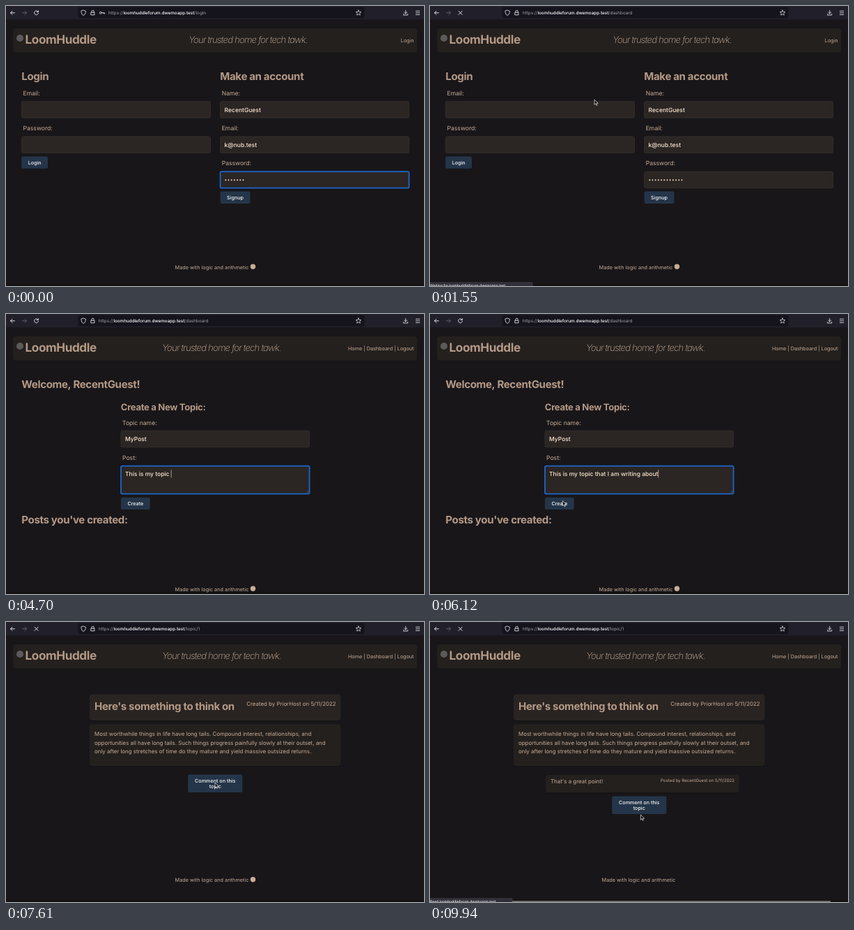
An HTML page for the animation above (10 s loop, 600 by 401 pixels).

```html
<!DOCTYPE html>
<html lang="en">
<head>
<meta charset="utf-8">
<title>Forum walkthrough</title>
<style>
  html, body { margin: 0; width: 100%; height: 100%; overflow: hidden; background: #181619; }
  svg { display: block; width: 100vw; height: 100vh; font-family: Inter, "Open Sans", sans-serif; text-rendering: geometricPrecision; }
</style>
</head>
<body>
<svg id="stage" viewBox="0 0 600 401"></svg>
<script>
const LOOP = 10000;
const TAN = '#c8ad97', HEAD = '#b39885', PEACH = '#ffe8d4', BAR = '#24201e', CARD = '#292422', FIELD = '#2b2624', BLUE = '#b9e3f7';
const BRAND = 'LoomHuddle', HOST = 'loomhuddleforum.dwemoapp.test';
const USER = 'RecentGuest', AUTHOR = 'PriorHost', DATE = 'on 5/11/2022';
const TITLE = "Here's something to think on";
const TOPIC = 'This is my topic that I am writing about';
const COMMENT = "That's a great point!";
const QUOTE = 'Most worthwhile things in life have long tails. Compound interest, relationships, and opportunities all have long tails. Such things progress painfully slowly at their outset, and only after long stretches of time do they mature and yield massive outsized returns.';

const stage = document.getElementById('stage');
const pen = document.createElement('canvas').getContext('2d');

// ---- drawing helpers ----
const rect = (x, y, r, b, fill, radius = 0, extra = '') =>
  `<rect x="${x}" y="${y}" width="${r - x}" height="${b - y}" rx="${radius}" fill="${fill}" ${extra}/>`;
const line = (d, color, width = 1) =>
  `<path d="${d}" fill="none" stroke="${color}" stroke-width="${width}" stroke-linecap="round" stroke-linejoin="round"/>`;
const dot = (x, y, r, fill) => `<circle cx="${x}" cy="${y}" r="${r}" fill="${fill}"/>`;
const text = (s, x, y, size, fill = TAN, anchor = 'start', extra = '') =>
  `<text x="${x}" y="${y}" font-size="${size}" fill="${fill}" text-anchor="${anchor}" ${extra}>${s.replace(/ /g, '\u00a0')}</text>`;
const heading = (s, x, y, size = 15.1, anchor = 'start', fill = HEAD) =>
  text(s, x, y, size, fill, anchor, 'font-weight="700" letter-spacing="-.025em"');
const label = (s, x, y, anchor) => text(s, x, y, 8.6, TAN, anchor);
const card = (y, b, fill = CARD, x = 120, r = 480.5) =>
  rect(x, y + 1, r, b + 1.2, '#121011', 4, 'opacity=".6"') + rect(x, y, r, b, fill, 4);
const lines = (words, breaks, x, y, step, size, anchor) => {
  let rest = words;
  return [...breaks, null].map((start, i) => {
    const cut = start ? rest.indexOf(start) : rest.length;
    const part = rest.slice(0, cut).trim();
    rest = rest.slice(cut);
    return text(part, x, y + i * step, size, TAN, anchor);
  }).join('');
};

function button(s, x, y, r, b) {
  const rows = s.split('\n'), mid = (y + b) / 2 + 2.6 - (rows.length - 1) * 4.4;
  return rect(x, y, r, b, '#253549', 2) +
    rows.map((row, i) => text(row, (x + r) / 2, mid + i * 8.8, 7.2, '#f6f8fb', 'middle', 'font-weight="500"')).join('');
}

function field(x, y, r, b, { value = '', focus = false, caret = focus, area = false } = {}) {
  let out = rect(x, y, r, b, FIELD, 2, `stroke="${focus ? '#1c66c9' : '#3b3430'}" stroke-width="${focus ? 1.8 : .7}"`);
  if (area) out += line(`M${r - 4.5} ${b - 1.5}l3 -3M${r - 2.5} ${b - 1.5}l1 -1`, '#6b625c', .5);
  const base = area ? y + 14.3 : y + 15.2;
  out += text(value, x + 6, base, 8.5, PEACH, 'start', 'font-weight="500"');
  if (caret) {
    pen.font = '500 85px Inter, "Open Sans", sans-serif';
    const cx = x + 6.4 + pen.measureText(value).width / 10;
    out += line(`M${cx} ${base - 8.6}V${base + 2.2}`, PEACH, .6);
  }
  return out;
}

function footer(y, icon = true) {
  return text('Made with logic and arithmetic', icon ? 295.5 : 299.5, y + 2.8, 7.3, TAN, 'middle') +
    (icon ? dot(354.5, y - .7, 3.7, TAN) : '');
}

function header(guest) {
  return rect(10.5, 32, 590, 66.3, BAR, 4) + dot(20, 46, 5, '#5d5a5b') +
    heading(BRAND, 27.5, 53.8, 17.2) +
    text('Your trusted home for tech tawk.', guest ? 347.5 : 309.5, 52.6, 13.2, '#ccb29c', 'middle',
      'font-style="italic" font-weight="200" letter-spacing="-.06em"') +
    text(guest ? 'Login' : 'Home | Dashboard | Logout', 585.5, 52.2, 7.25, TAN, 'end');
}

// ---- timing helpers ----
const at = (steps, t) => steps.reduce((now, s) => s[0] <= t ? s : now, steps[0]);
const typed = (s, t, start, end) =>
  s.slice(0, Math.max(0, Math.min(s.length, Math.floor((t - start) / (end - start) * s.length + 1))));

// ---- pages ----
const pages = {
  login(t) {
    const dots = Math.min(12, 7 + Math.floor(t / 45));
    let out = header(true) + heading('Login', 22.3, 106.2) + heading('Make an account', 307.3, 106.2) +
      label('Email:', 24.5, 128) + field(22.3, 136.7, 293.5, 160.2) +
      label('Password:', 24.5, 178) + field(22.3, 186.9, 293.5, 210.4) + button('Login', 22.3, 215.5, 60, 232.8) +
      label('Name:', 309.7, 128) + field(307.6, 136.7, 578.5, 160.2, { value: USER }) +
      label('Email:', 309.7, 178) + field(307.6, 186.9, 578.5, 210.4, { value: 'k@nub.test' }) +
      label('Password:', 309.7, 228.3) + field(307.6, 237.1, 578.5, 260.7, { focus: t < 950, caret: false }) +
      button('Signup', 307.6, 265.6, 350.4, 283);
    for (let i = 0; i < dots; i++) out += dot(315.3 + i * 4.2, 249.2, .95, PEACH);
    return out + footer(374);
  },
  dashboard(t) {
    const first = TOPIC.slice(0, 17), rest = TOPIC.slice(17);
    return header() + heading(`Welcome, ${USER}!`, 22.3, 106.2) +
      heading('Create a New Topic:', 164.8, 137.8, 13.1) +
      label('Topic name:', 167, 158.6) +
      field(165, 167.2, 435.6, 190.8, { value: typed('MyPost', t, 3130, 3400), focus: t >= 2970 && t < 3690 }) +
      label('Post:', 167, 208.7) +
      field(165, 217.7, 435.6, 257.6, {
        value: typed(first, t, 3960, 4690) + typed(rest, t, 4790, 5760),
        focus: t >= 3690 && t < 6230, area: true
      }) +
      button('Create', 165, 262.7, 206.7, 280) +
      heading("Posts you've created:", 22.3, 300.2) + footer(394);
  },
  list(t, mouse) {
    const hover = mouse.y > 110 && mouse.y < 130;
    return header() + card(103.6, 141) + heading(TITLE, 127, 126, 15.1, 'start', hover ? BLUE : HEAD) +
      text(`Created by ${AUTHOR} ${DATE}`, 473.6, 120.4, 7.9, TAN, 'end') +
      card(146.5, 186.8, BAR) + lines(QUOTE, ['have long tails. Such', 'time do'], 127, 160.6, 8.9, 7.3) +
      card(207.5, 245) + heading('MyPost', 127, 229.9) +
      text(`Created by ${USER} ${DATE}`, 473.6, 224.3, 7.9, TAN, 'end') +
      card(249.7, 273.5, BAR) + text(TOPIC, 127, 264.6, 7.35) + footer(368);
  },
  topic(t) {
    const posted = t > 9000, top = posted ? 249.6 : 218.6;
    return header() + card(103.6, 141) + heading(TITLE, 127, 126) +
      text(`Created by ${AUTHOR} ${DATE}`, 473.6, 120.4, 7.9, TAN, 'end') +
      card(146.5, 206, BAR) + lines(QUOTE, ['opportunities', 'only after'], 127, 163, 12.5, 7.92) +
      (posted ? card(219, 244.2, BAR, 166, 443.6) + text(COMMENT, 173, 230.8, 7.95) +
        text(`Posted by ${USER} ${DATE}`, 437, 228.5, 6.1, TAN, 'end') : '') +
      button('Comment on this\ntopic', 261.2, top, 339.3, top + 25.4) + footer(369.5, !posted);
  },
  comment(t) {
    return header() + heading(TITLE, 300, 106.2, 15.1, 'middle') +
      lines(QUOTE, ['slowly'], 300, 123, 12.6, 7.92, 'middle') +
      text(`Created by ${AUTHOR} ${DATE}`, 300, 156, 7.9, TAN, 'middle') +
      heading('Add your comment:', 300, 183, 13.1, 'middle') + label('Comment:', 301.5, 203.6, 'middle') +
      field(165, 212.2, 435.6, 252.6, { value: typed(COMMENT, t, 8080, 8980), focus: t >= 8040 && t < 9330, area: true }) +
      button('Post', 283, 257.7, 317.5, 275) + footer(366.7);
  }
};

const pageSteps = [[0, 'login'], [1660, 'dashboard'], [6450, 'list'], [7260, 'topic'], [7800, 'comment'], [9650, 'topic']];
const pathSteps = [[0, '/login'], [1100, '/dashboard'], [6400, ''], [7080, '/topic/1'], [7660, '/topic/1/comment'], [9450, '/topic/1']];
const loadSteps = [[0, 0], [1060, 1], [1900, 0], [6250, 1], [6700, 0], [7080, 1], [7920, 0], [9350, 1]];
const statusSteps = [[0, ''], [1250, 'Waiting for', 147], [1800, ''], [6330, 'Waiting for', 147], [6650, ''],
  [7100, 'Read', 113], [7400, ''], [9500, 'Read', 118]];

// ---- browser bar ----
function chrome(t) {
  const ink = '#f1f0f6', dim = '#66656f', path = at(pathSteps, t)[1], signIn = path === '/login';
  const arrow = (x, d, c) => line(`M${x - 3 * d} 9.8h${6 * d}M${x - .4 * d} 7.2L${x - 3 * d} 9.8l${2.6 * d} 2.6`, c, .9);
  let out = rect(0, 0, 600, 19.3, '#201f2a') + rect(103.5, 1.8, 514.5, 17.6, '#15141d', 2.5) +
    arrow(9.5, 1, ink) + arrow(26.5, -1, dim);
  out += at(loadSteps, t)[1]
    ? line('M41 7.2l5.2 5.2m0 -5.2l-5.2 5.2', ink, .9)
    : line('M46 8.2A2.9 2.9 0 1 0 46.4 10.4M46.4 6.7v2h-2', ink, .9);
  out += line('M111.2 6.1l3.2 1.2c0 3 -.7 4.9 -3.2 6.2c-2.5 -1.3 -3.2 -3.2 -3.2 -6.2z', ink, .8) +
    line('M122.2 9.2h4.8v3.6h-4.8zM123 9v-1.2a1.6 1.6 0 0 1 3.2 0v1.2', ink, .8);
  if (signIn) out += line('M137.2 9.8a1.4 1.4 0 1 1 -2.8 0a1.4 1.4 0 1 1 2.8 0h4.3v1.4m-1.6 -1.4v1', ink, .8);
  out += `<text x="${signIn ? 147 : 133}" y="12" font-size="6.3" fill="#a3a2ab">https://<tspan fill="#fff" font-weight="500">${HOST}</tspan>${path}</text>`;
  let star = '';
  for (let i = 0; i < 10; i++) {
    const r = i % 2 ? 1.8 : 4, a = (i / 5 - .5) * Math.PI;
    star += `${i ? 'L' : 'M'}${506 + r * Math.cos(a)} ${9.9 + r * Math.sin(a)}`;
  }
  return out + line(star + 'z', ink, .7) +
    line('M573.7 6.3v4.6m-2.1 -2l2.1 2l2.1 -2M570.7 11.4v1.6h6v-1.6', ink, .8) +
    line('M588.3 7.2h5.4m-5.4 2.6h5.4m-5.4 2.6h5.4', ink, .8);
}

function status(t) {
  const [, verb, width] = at(statusSteps, t);
  const scrollbar = t > 9650 ? rect(width, 399.4, 575, 401, '#7a787b') : '';
  return scrollbar + (verb ? rect(-2, 396, width, 404, '#302f37', 1, 'stroke="#55545c" stroke-width=".5"') +
    text(`${verb} ${HOST}…`, 0, 402, 5, '#f0eff4', 'start', 'font-weight="500"') : '');
}

// ---- pointer: time, x, y, look until the next stop ----
const stops = [
  [0, 330, 249, ''], [320, 330, 249, 'beam'], [520, 330, 261, 'arrow'], [720, 329, 272, 'arrow'],
  [1080, 329, 272, 'arrow'], [1500, 236, 134, 'arrow'], [1560, 236, 134, 'arrow'], [1700, 232, 123, 'arrow'],
  [2700, 232, 123, 'arrow'], [2860, 206, 170, 'beam'], [2960, 204, 180, 'beam'], [3130, 204, 180, ''],
  [3420, 204, 180, 'beam'], [3560, 210, 264, 'arrow'], [3690, 214, 238, 'beam'], [3950, 214, 238, ''],
  [5850, 214, 238, 'beam'], [6000, 200, 260, 'arrow'], [6180, 187, 270, 'arrow'], [6520, 187, 270, 'arrow'],
  [6900, 181, 128, 'hand'], [7020, 180, 121, 'hand'], [7260, 180, 121, 'arrow'], [7580, 300, 230, 'arrow'],
  [7910, 300, 230, 'beam'], [8030, 300, 236, 'beam'], [8080, 300, 236, ''], [9080, 300, 236, 'beam'],
  [9180, 300, 254, 'arrow'], [9300, 301, 267, 'arrow'], [9650, 301, 267, 'arrow'], [9850, 302.3, 276, 'arrow'], [LOOP, 302.3, 276, 'arrow']
];
function pointer(t) {
  const i = Math.max(0, stops.findIndex(s => s[0] > t) - 1);
  const [t0, x0, y0, look] = stops[i], [t1, x1, y1] = stops[i + 1];
  const k = (t - t0) / (t1 - t0), e = k * k * (3 - 2 * k);
  return { x: x0 + (x1 - x0) * e, y: y0 + (y1 - y0) * e, look };
}
const looks = {
  '': '',
  arrow: '<path d="M0 0v7.2l1.7 -1.5l1.1 2.6l1.3 -.6l-1.1 -2.5h2.3z" fill="#111" stroke="#eee" stroke-width=".7"/>',
  beam: line('M-1.6 -4q1.6 0 1.6 1q0 -1 1.6 -1M0 -3v6M-1.6 4q1.6 0 1.6 -1q0 1 1.6 1', '#d8d4d0', .8),
  hand: '<path d="M-.7 0q.8 -.8 1.4 0v3l3 .8q.8 .4 .5 1.6l-.7 2.8h-3.9l-2.2 -3.2q.3 -.9 1.9 .2z" fill="#111" stroke="#eee" stroke-width=".7"/>'
};

let shown = '';
function draw(t) {
  const mouse = pointer(t);
  const picture = rect(0, 0, 600, 401, '#181619') + rect(0, 398, 600, 401, '#131112') +
    pages[at(pageSteps, t)[1]](t, mouse) + chrome(t) + status(t) +
    `<g transform="translate(${mouse.x.toFixed(2)} ${mouse.y.toFixed(2)})">${looks[mouse.look]}</g>`;
  if (picture !== shown) stage.innerHTML = shown = picture;
}

const start = performance.now();
function tick() {
  draw((performance.now() - start) % LOOP);
  requestAnimationFrame(tick);
}
tick();
</script>
</body>
</html>
```
